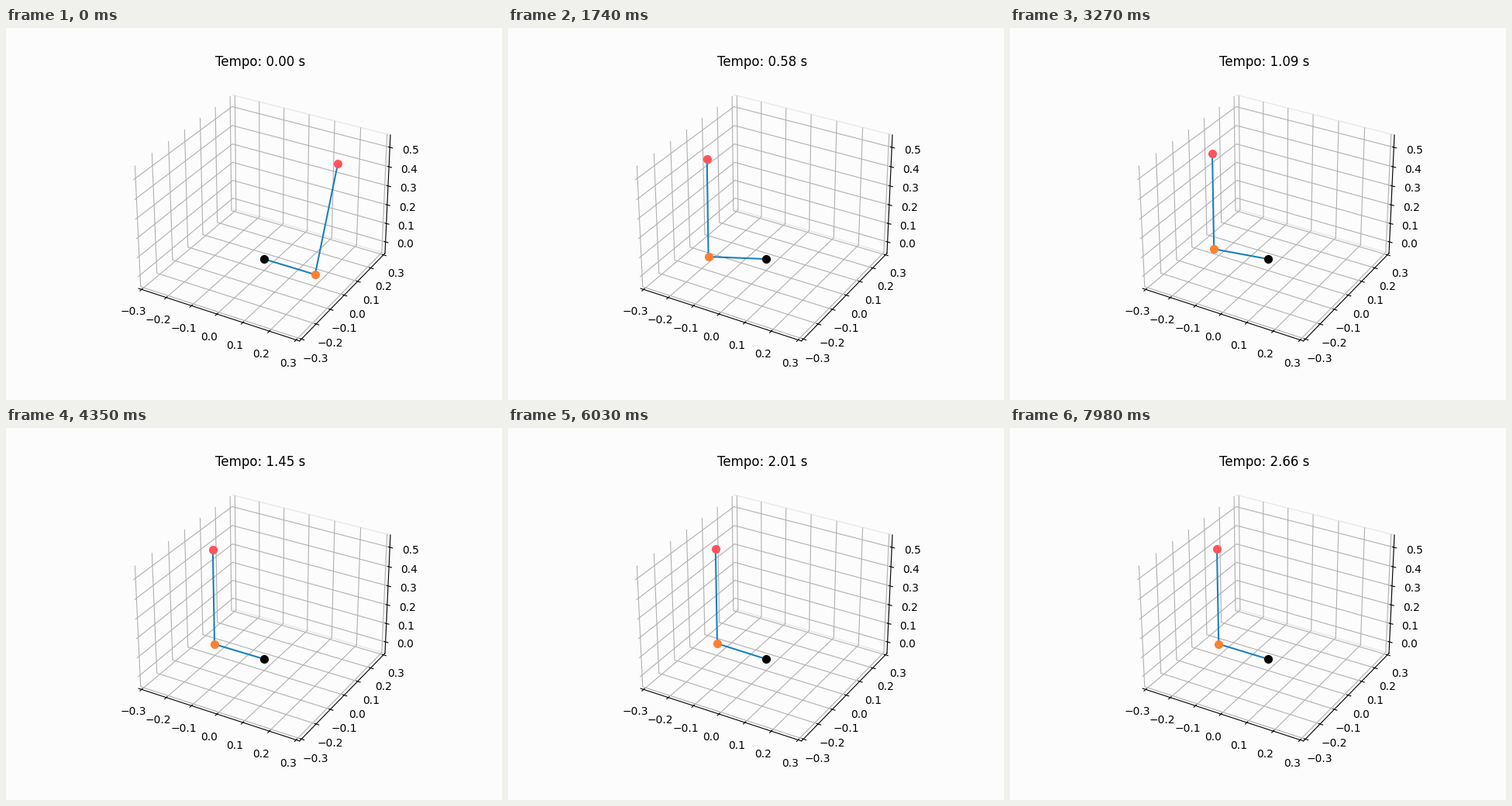
These frames come from a looping animation (640x480 px, 8 s). A matplotlib script:

```python
import matplotlib.pyplot as plt
import numpy as np
from matplotlib.animation import FuncAnimation
from numpy import cos, exp, pi, sin

LOOP_MS = 8000
FRAMES = 267
DT = 0.01
ARM, ROD = 0.2, 0.5
BACK = "#fcfcfc"
UP = np.array([0, 0, 1])


def arm_angle(t):
    """Half a turn from rest: damped swing with overshoot, eased at the start."""
    rate, settle = 2.7, 1.48
    gain = -pi / sin(rate * settle)
    kick = -gain * rate * (sin(rate * settle) + cos(rate * settle))
    swing = gain * exp(-rate * t) * sin(rate * (settle - t))
    return pi + swing - kick * t * exp(-7.45 * t)


def rod_tilt(t):
    """Falls from 0.3 rad, dips past upright and creeps back."""
    return 0.65 * exp(-14.5 * t) * (1 + 12.3 * t) - 0.35 * exp(-4 * t)


def joints(t):
    theta, tilt = arm_angle(t), rod_tilt(t)
    elbow = ARM * np.array([cos(theta), sin(theta), 0])
    side = np.array([-sin(theta), cos(theta), 0])
    tip = elbow + ROD * (sin(tilt) * side + cos(tilt) * UP)
    return np.array([np.zeros(3), elbow, tip])


plt.rcParams["axes3d.automargin"] = True
fig = plt.figure(figsize=(6.4, 4.8), dpi=100, facecolor=BACK)
ax = fig.add_subplot(projection="3d", facecolor=BACK)
ax.set(xlim=(-0.3, 0.3), ylim=(-0.3, 0.3), zlim=(-0.05, 0.55))
ax.xaxis.pane.set_visible(False)
ax.zaxis.pane.set_visible(False)
ax.yaxis.pane.set(alpha=1, fill=False, edgecolor="#e8e8e8")

title = ax.set_title("")
links, = ax.plot([], [], [], color="#1a80c0", lw=1.5)
dots = [ax.plot([], [], [], "o", color=c, ms=7, zorder=5)[0]
        for c in ("black", "#ff8030", "#ff545a")]


def update(n):
    t = n * DT
    points = joints(t)
    links.set_data_3d(*points.T)
    for dot, p in zip(dots, points):
        dot.set_data_3d(*p[:, None])
    title.set_text(f"Tempo: {t:.2f} s")
    return [links, title, *dots]


anim = FuncAnimation(fig, update, frames=FRAMES, interval=LOOP_MS / FRAMES,
                     init_func=lambda: update(0), repeat=True)
plt.show()
```
